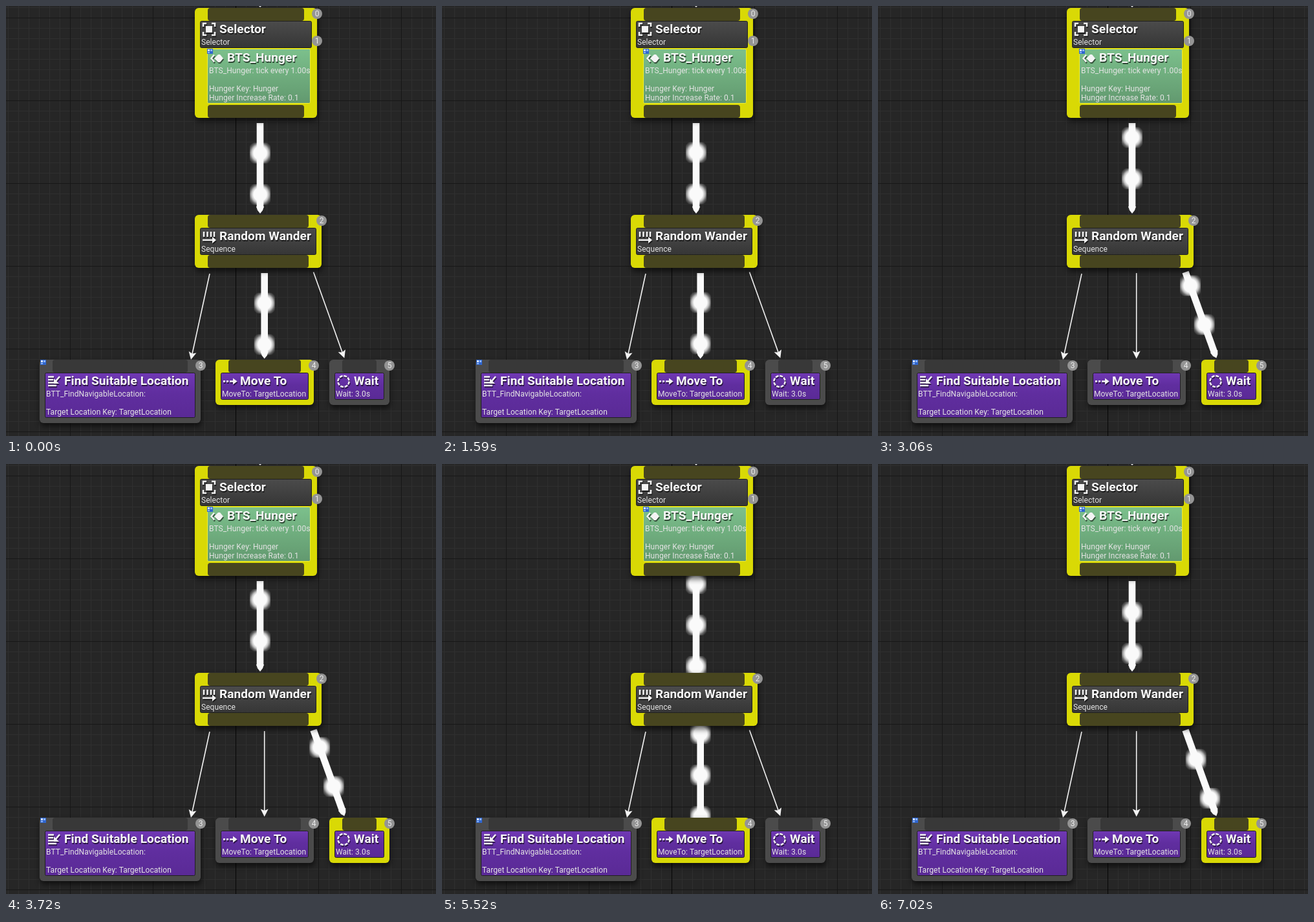
An HTML page that plays this animation: 665 by 665 pixels, repeating every 7.14 s.

```html
<!DOCTYPE html>
<html lang="en">
<head>
<meta charset="utf-8">
<title>Behavior tree</title>
<style>
  html, body { margin: 0; width: 100%; height: 100%; overflow: hidden; background: #262626; }
  svg { display: block; width: 665px; height: 665px; }
  text { font-family: Roboto, "Noto Sans", sans-serif; fill: #e4e4e4; white-space: pre; }
  .title { font-size: 19px; font-weight: 700; letter-spacing: .1px; fill: #f8f8f8; }
  .title.shade { fill: #000; fill-opacity: .6; }
  .body { font-size: 12px; letter-spacing: .06px; }
  .badge { font-size: 12px; text-anchor: middle; fill: #ececec; }
  .frame { fill: #4b4b4b; }
  .pin { fill: #383838; }
  .lit .frame { fill: #d9d905; }
  .lit .pin { fill: #47451f; }
  .icon { fill: none; stroke: #f4f4f4; stroke-width: 2.5; }
  .solid { fill: #f4f4f4; stroke: none; }
  .thin { stroke: #f4f4f4; stroke-width: 1.6; fill: #f4f4f4; }
  .thick { stroke: #fafafa; stroke-width: 10.6; fill: #fafafa; }
  .thin path, .thick path { stroke: none; }
</style>
</head>
<body>
<svg id="stage" viewBox="0 0 665 665">
  <defs>
    <linearGradient id="gray" x2="0" y2="1"><stop stop-color="#4b4b4b"/><stop offset="1" stop-color="#363636"/></linearGradient>
    <linearGradient id="green" x2="0" y2="1"><stop stop-color="#7cc08c"/><stop offset="1" stop-color="#62996f"/></linearGradient>
    <linearGradient id="purple" x2="0" y2="1"><stop stop-color="#7038b4"/><stop offset=".45" stop-color="#602e9f"/><stop offset="1" stop-color="#5a2a96"/></linearGradient>
    <radialGradient id="glow" gradientUnits="userSpaceOnUse" cx="0" cy="0" r="20">
      <stop offset=".5" stop-color="#fafafa"/>
      <stop offset=".66" stop-color="#fafafa" stop-opacity=".72"/>
      <stop offset=".82" stop-color="#fafafa" stop-opacity=".28"/>
      <stop offset="1" stop-color="#fafafa" stop-opacity="0"/>
    </radialGradient>
    <filter id="soft" x="-20%" y="-20%" width="140%" height="150%"><feGaussianBlur stdDeviation="4"/></filter>
  </defs>
</svg>
<script>
const stage = document.getElementById('stage');
const LOOP = 7140, STEP = 30, LAST = 7020, SPACING = 64;

const rect = (x, y, r, b, attrs) =>
  `<rect x="${x}" y="${y}" width="${r - x}" height="${b - y}" ${attrs}/>`;
const path = (d, cls = 'icon') => `<path class="${cls}" d="${d}"/>`;
const text = (x, y, cls, s) => `<text x="${x}" y="${y}" class="${cls}">${s}</text>`;
const title = (x, y, s) => text(x + 1, y + 2, 'title shade', s) + text(x, y, 'title', s);
const badge = (x, y, n) =>
  `<circle cx="${x}" cy="${y}" r="8" fill="#949494"/>` + text(x, y + 4.3, 'badge', n);
const marker = (x, y) =>
  rect(x, y, x + 9, y + 8, 'fill="#2f66cf"') +
  rect(x + 1, y + 1, x + 4, y + 4, 'fill="#dbe8ff"') +
  rect(x + 5, y + 1, x + 8, y + 4, 'fill="#8db4f5"') +
  rect(x + 1, y + 5, x + 4, y + 7, 'fill="#8db4f5"');
const panel = (x, y, r, b, fill, edge = '#202020') =>
  rect(x + .5, y + .5, r - .5, b - .5, `rx="2" fill="url(#${fill})" stroke="${edge}"`);

function grid() {
  let fine = '', major = '';
  for (let i = 3; i < 665; i += 16) fine += `M${i + .5} 0V665`;
  for (let i = 2; i < 665; i += 16) fine += `M0 ${i + .5}H665`;
  for (let i = 99; i < 665; i += 128) major += `M${i + .5} 0V665`;
  for (let i = 18; i < 665; i += 128) major += `M0 ${i + .5}H665`;
  return rect(0, 0, 665, 665, 'fill="#262626"') +
    `<path d="${fine}" stroke="#2f2f2f"/><path d="${major}" stroke="#171717"/>` +
    '<path d="M355.5 0V665" stroke="#050505"/>';
}

const icons = {
  selector: path('M305 32V27H310M318 27H323V32M323 40V45H318M310 45H305V40') +
    path('M309 31h10v10h-10z', 'solid'),
  sequence: path('M306 349V357M311.5 349V357M317 349V357M322 349V357') +
    path('M304 362H321') + path('M319 357l6 5-6 5z', 'solid'),
  service: path('M322 75.5L317.5 81L322 86.5') + path('M322 81l6-6h3l5 6-5 6h-3z', 'solid'),
  find: path('M65 573.5H74M65 578H73M65 582.5H74M65 587H78') +
    path('M83 573L77 580') + path('M74 576v8h8z', 'solid'),
  move: path('M336 579h3v3h-3zM341 579h3v3h-3z', 'solid') +
    path('M346 580.5H353') + path('M351 575.5l6.5 5-6.5 5z', 'solid'),
  wait: '<circle class="icon" cx="522" cy="580.5" r="8.6" stroke-width="3.2" stroke-dasharray="5 1.75"/>'
};
const shaded = s => `<g transform="translate(1 2)" opacity=".55" style="filter:brightness(0)">${s}</g>${s}`;

const nodes = [
  { id: 'root', box: [292, 3, 481, 173], pins: [312, 461], ends: true,
    inner: panel(300, 23, 473, 65, 'gray') + shaded(icons.selector) +
      title(330, 42, 'Selector') + text(302, 60, 'body', 'Selector') +
      panel(311, 66, 471, 151, 'green', '#f0ee32') + shaded(icons.service) + marker(311, 66) +
      title(342, 86, 'BTS_Hunger') +
      text(314, 104, 'body', 'BTS_Hunger: tick every 1.00s') +
      text(314, 132, 'body', 'Hunger Key: Hunger') +
      text(314, 146, 'body', 'Hunger Increase Rate: 0.1') +
      badge(481, 12, 0) + badge(481, 54, 1) },
  { id: 'wander', box: [292, 323, 488, 405], pins: [312, 468], ends: true,
    inner: panel(300, 343, 480, 385, 'gray') + shaded(icons.sequence) +
      title(330, 362, 'Random Wander') + text(302, 380, 'body', 'Sequence') + badge(488, 332, 2) },
  { id: 'find', box: [52, 547, 301, 645], pins: [72, 281],
    inner: panel(60, 567, 293, 637, 'purple') + shaded(icons.find) + marker(53, 547) +
      title(90, 586, 'Find Suitable Location') +
      text(62, 604, 'body', 'BTT_FindNavigableLocation:') +
      text(62, 632, 'body', 'Target Location Key: TargetLocation') + badge(301, 556, 3) },
  { id: 'move', box: [324, 547, 476, 617], pins: [344, 456],
    inner: panel(332, 567, 468, 609, 'purple') + shaded(icons.move) +
      title(362, 586, 'Move To') + text(334, 604, 'body', 'MoveTo: TargetLocation') + badge(476, 556, 4) },
  { id: 'wait', box: [500, 547, 593, 617], pins: [520, 573],
    inner: panel(508, 567, 585, 609, 'purple') + shaded(icons.wait) +
      title(538, 586, 'Wait') + text(510, 604, 'body', 'Wait: 3.0s') + badge(593, 556, 5) }
];

function node({ id, box: [x, y, r, b], pins: [p, q], ends, inner }) {
  const pin = top => rect(p, top, q, top + 20, 'rx="4" class="pin"');
  return rect(x + 1, y + 4, r + 1, b + 5, 'rx="6" fill="#000" opacity=".6" filter="url(#soft)"') +
    `<g id="${id}">` + rect(x, y, r, b, 'rx="6" class="frame"') +
    pin(y) + (ends ? pin(b - 20) : '') + inner + '</g>';
}

// Each wire is drawn along +x from its start, then rotated into place.
const wires = [
  { id: 'toWander', from: [393, 181], to: [393, 321] },
  { id: 'toFind', from: [315, 414], to: [286, 547] },
  { id: 'toMove', from: [399.7, 413], to: [399.7, 545.5] },
  { id: 'toWait', from: [475.5, 411.5], to: [523.3, 544.5] }
];

function wire(w) {
  const [x, y] = w.from, dx = w.to[0] - x, dy = w.to[1] - y;
  const len = w.len = Math.hypot(dx, dy);
  const angle = Math.atan2(dy, dx) * 180 / Math.PI;
  const place = `transform="translate(${x} ${y}) rotate(${angle})"`;
  w.dir = [dx / len, dy / len];
  const thin = `<g class="thin" ${place}><line x2="${len - 8}"/>` +
    `<path d="M${len} 0l-12 -6 2.5 6 -2.5 6z"/></g>`;
  const dot = rect(-16, -16, 16, 16, 'fill="url(#glow)" class="dot"');
  const thick = `<g class="flow"><g class="thick" ${place}><line x2="${len - 9}"/>` +
    `<path d="M${len} 0l-5 -4 -6 -2v12l6 -2z"/></g>${dot.repeat(3)}</g>`;
  return `<g id="${w.id}">${thin}${thick}</g>`;
}

stage.insertAdjacentHTML('beforeend',
  grid() + '<path d="M391 0h4l-2 2z" fill="#f4f4f4"/>' +
  wires.map(wire).join('') + nodes.map(node).join(''));

for (const w of wires) {
  const g = document.getElementById(w.id);
  w.thin = g.querySelector('.thin');
  w.flow = g.querySelector('.flow');
  w.dots = [...g.querySelectorAll('.dot')];
}
for (const n of nodes) n.el = document.getElementById(n.id);

const moving = ['root', 'wander', 'move', 'toWander', 'toMove'];
const waiting = ['root', 'wander', 'wait', 'toWander', 'toWait'];
const phases = [[0, moving], [1830, waiting], [4710, []], [4740, moving], [6150, waiting]];

// Distance travelled by the dots, [ms, px].
const travel = [[0, 46.5], [750, 197], [2370, 522], [3720, 796.5], [4440, 941], [5520, 1156], [7020, 1456]];

function distance(t) {
  const i = Math.max(1, travel.findIndex(p => p[0] >= t));
  const [t0, d0] = travel[i - 1], [t1, d1] = travel[i];
  return d0 + (d1 - d0) * (t - t0) / (t1 - t0);
}

function draw(now) {
  const t = Math.min(LAST, Math.floor((now % LOOP) / STEP) * STEP);
  const active = phases.filter(p => p[0] <= t).pop()[1];
  const offset = distance(t) % SPACING;
  for (const n of nodes) n.el.classList.toggle('lit', active.includes(n.id));
  for (const w of wires) {
    const on = active.includes(w.id);
    w.thin.style.display = on ? 'none' : '';
    w.flow.style.display = on ? '' : 'none';
    w.dots.forEach((dot, i) => {
      const d = offset + i * SPACING;
      dot.style.display = d < w.len ? '' : 'none';
      dot.setAttribute('transform', `translate(${w.from[0] + w.dir[0] * d} ${w.from[1] + w.dir[1] * d})`);
    });
  }
}

const start = performance.now();
function tick() {
  draw(performance.now() - start);
  requestAnimationFrame(tick);
}
tick();
</script>
</body>
</html>
```
